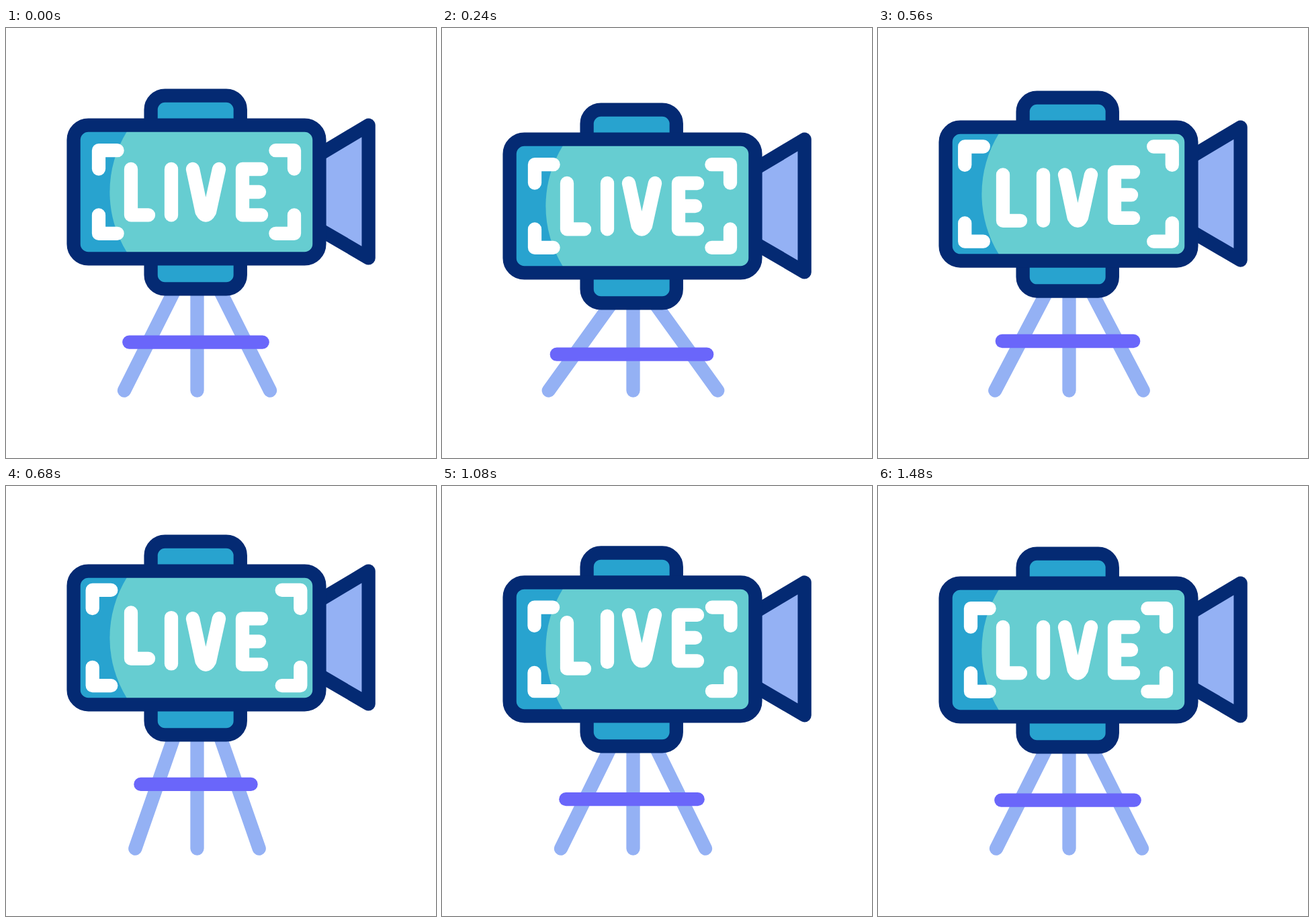
An HTML page that plays this animation: 640 by 640 pixels, repeating every 1800 ms.

```html
<!DOCTYPE html>
<html lang="en">
<head>
<meta charset="utf-8">
<title>Live camera</title>
<style>
  html, body { margin: 0; height: 100%; overflow: hidden; background: #fff; }
  svg { display: block; width: 100vw; height: 100vh; }
  path, rect { stroke-width: 20.3; stroke-linecap: round; stroke-linejoin: round; }
  .dark { stroke: #042a73; }
  .white { fill: none; stroke: #fff; }
  .leg { stroke: #94b1f4; fill: none; }
</style>
</head>
<body>
<svg viewBox="0 0 640 640">
  <path id="legs" class="leg"/>
  <path id="bar" stroke="#6a66fa"/>
  <g id="camera">
    <rect class="dark" x="215.6" y="100.6" width="133.2" height="287.8" rx="21" fill="#28a3cf"/>
    <path class="dark" d="M466 188.6 539.6 144.6V342.4L466 299.4Z" fill="#94b1f4"/>
    <rect x="100.6" y="144.6" width="365.8" height="198.8" rx="22" fill="#28a3cf"/>
    <path d="M180 154A171 171 0 0 0 180 334H450L460 324V164L450 154Z" fill="#66cdd1"/>
    <rect class="dark" x="100.6" y="144.6" width="365.8" height="198.8" rx="22" fill="none"/>
    <g class="white">
      <path class="corner" d="M138 209.5V182.2H165.6"/>
      <path class="corner" d="M401.4 182.2H429V209.5"/>
      <path class="corner" d="M138 278.5V305.8H165.6"/>
      <path class="corner" d="M401.4 305.8H429V278.5"/>
      <path class="letter" d="M186 210V278.4H212"/>
      <path class="letter" d="M246 210V278.4"/>
      <path class="letter" d="M278 210 291.5 273Q297.3 284 303.1 273L317 210"/>
      <path class="letter" d="M380 210H352V278.4H380M352 244H377"/>
    </g>
  </g>
</svg>
<script>
const LOOP = 1800, STEP = 40, LETTER_DELAY = 80;
const byId = id => document.getElementById(id);
const corners = document.querySelectorAll('.corner');
const letters = document.querySelectorAll('.letter');
const legs = byId('legs'), bar = byId('bar'), camera = byId('camera');

// Eased value at time t through [time, value] keys
function track(t, keys) {
  let [t0, v0] = keys[0];
  for (const [t1, v1] of keys) {
    if (t < t1) {
      const u = Math.max(0, (t - t0) / (t1 - t0));
      return v0 + (v1 - v0) * u * u * (3 - 2 * u);
    }
    [t0, v0] = [t1, v1];
  }
  return v0;
}

// Rest, lowered, raised, rest
const bob = (t, rest, low, high) => track(t, [
  [40, rest], [320, low], [400, low], [720, high], [840, high], [1120, rest]
]);
const spread = t => track(t, [[320, 0], [600, 9.3], [840, 9.3], [1120, 0]]);
const hop = t => track(t, [
  [280, 0], [400, 5.3], [560, 5.3], [840, -17], [960, -17], [1180, 3], [1240, 0]
]);
const move = (el, x, y) => el.setAttribute('transform', `translate(${x} ${y})`);

function draw(t) {
  const y = bob(t, 0, 26.2, -20), cx = 284.5;
  const foot = bob(t, 108.5, 130, 90.5);
  const barY = bob(t, 467.6, 490.2, 441.8), half = bob(t, 99.2, 114.8, 80.6);
  const top = 392 + y;

  move(camera, 0, y);
  legs.setAttribute('d', [-1, 0, 1].map(s =>
    `M${cx + s * 34.5} ${top}L${cx + s * foot} 539.6`).join(''));
  bar.setAttribute('d', `M${cx - 2.2 - half + 0.2} ${barY}H${cx - 2 + half}`);

  const e = spread(t);
  corners.forEach((c, i) => move(c, i % 2 ? e : -e, i < 2 ? -e : e));
  letters.forEach((l, i) => move(l, 0, hop(t - i * LETTER_DELAY)));
}

function tick() {
  const t = performance.now() % LOOP;
  draw(Math.floor(t / STEP) * STEP);
  requestAnimationFrame(tick);
}
tick();
</script>
</body>
</html>
```
